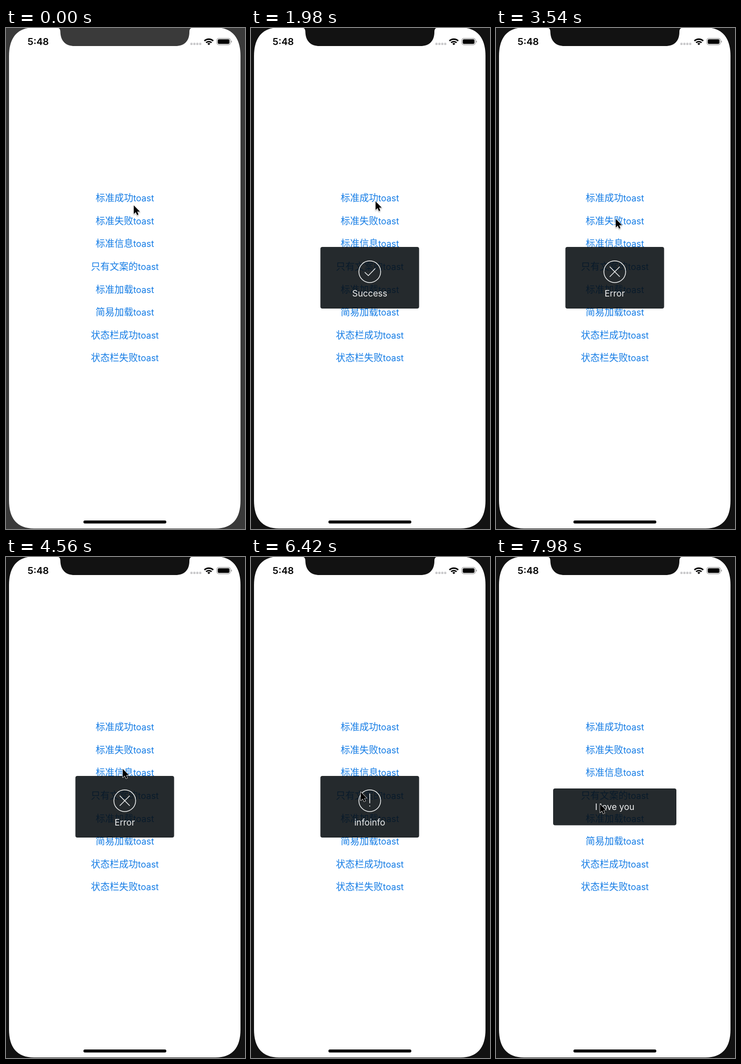
An HTML page for the animation above (8000 ms loop, 477x1000 px).

```html
<!DOCTYPE html>
<html lang="zh-CN">
<head>
<meta charset="utf-8">
<title>Toast demo</title>
<style>
  html, body { margin: 0; width: 100%; height: 100%; overflow: hidden; background: #121212; }
  svg { display: block; width: 100%; height: 100%; }
  text { font-family: Inter, "Noto Sans CJK SC", "Noto Sans CJK", sans-serif; }
  .label { font-size: 18.75px; fill: #147ce5; text-anchor: middle; }
  .label tspan { font-size: 17.7px; }
  .toast text { font-size: 17.4px; fill: #f0f1f1; text-anchor: middle; }
  .toast rect { fill: rgb(7, 13, 16); fill-opacity: .88; }
  .icon { fill: none; stroke: #eef0f0; stroke-width: 1.5; }
</style>
</head>
<body>
<svg viewBox="0 0 477 1000" preserveAspectRatio="none">
  <defs>
    <filter id="soft" x="-50%" y="-50%" width="200%" height="200%">
      <feDropShadow dx="0" dy="1.5" stdDeviation="1.3" flood-color="#000" flood-opacity=".35"/>
    </filter>
  </defs>

  <rect class="bezel" width="477" height="1000"/>
  <path fill="#fff" d="M6 56C6 20 22 -1 56 -1H418C452 -1 468 20 468 56V943C468 979 452 999 418 999H56C22 999 6 979 6 943Z"/>
  <path class="bezel" d="M102 -1C107 0 108.500 3 108.500 8C109 26 119 36 137 36H338C356 36 366 26 366 8C366 3 367.500 0 373 -1Z"/>

  <text x="43" y="34" font-size="19" font-weight="600">5:48</text>
  <g id="dots" fill="#c9c9cb"></g>
  <g fill="none" stroke="#000" stroke-width="2.900">
    <path d="M396 25.800a12.700 12.700 0 0 1 17.600 0"/>
    <path d="M399.300 29.300a8 8 0 0 1 11 0"/>
    <path d="M404.800 34.200l-2.900 -2.900a4.200 4.200 0 0 1 5.800 0Z" fill="#000" stroke="none"/>
  </g>
  <rect x="420.800" y="20.600" width="27" height="13" rx="4" fill="none" stroke="#9b9b9b" stroke-width="1.200"/>
  <rect x="422.600" y="22.400" width="23.400" height="9.400" rx="2.300"/>
  <path d="M449.200 24.800q1.800 .7 1.800 2.300t-1.800 2.300Z" fill="#9b9b9b"/>
  <rect x="154.500" y="983" width="165.500" height="6" rx="3"/>

  <g id="labels"></g>
  <g id="toasts"></g>
  <path id="cursor" d="M0 0V17.200L4 13.500L6.600 19.400L9.400 18.200L6.900 12.400H12.300Z"
        fill="#000" stroke="#fff" stroke-width="1.300" stroke-linejoin="round" paint-order="stroke" filter="url(#soft)"/>
</svg>

<script>
const NS = "http://www.w3.org/2000/svg";
const LOOP = 8000, STEP = 60;
const PRESS = 100, RESTORE = 470, HOLD = 2000, FADE_IN = 60, FADE_OUT = 180;
const WAKE = 320;

const names = ["标准成功", "标准失败", "标准信息", "只有文案的", "标准加载", "简易加载", "状态栏成功", "状态栏失败"];

// Each toast belongs to the button with the same index.
const toasts = [
  { at: 420, text: "Success", icon: "M227 487.500L234.200 494.300L248 480" },
  { at: 2690, text: "Error", icon: "M227 476.500L247 496.500M247 476.500L227 496.500" },
  { at: 5050, text: "infoinfo", icon: "M237 472V491.500M237 496V498" },
  { at: 7300, text: "I love you" }
];

// Cursor moves: start, end, x, y
const moves = [
  [0, 0, 255, 354],
  [60, 280, 250, 341],
  [1860, 2400, 239, 381],
  [3600, 4140, 233, 423],
  [6000, 6400, 219, 469],
  [7600, 7960, 207.5, 493]
];

const $ = id => document.getElementById(id);
const clamp = v => Math.min(1, Math.max(0, v));
const ease = v => v * v * (3 - 2 * v);

function add(parent, tag, attrs, text) {
  const el = document.createElementNS(NS, tag);
  for (const key in attrs) el.setAttribute(key, attrs[key]);
  if (text) el.textContent = text;
  parent.appendChild(el);
  return el;
}

for (let i = 0; i < 4; i++) {
  add($("dots"), "rect", { x: 368 + i * 5.8, y: 29.6, width: 4.4, height: 4.4, rx: 1.3 });
}

const labels = names.map((name, i) => {
  const el = add($("labels"), "text", { class: "label", x: 237.2, y: 346.2 + i * 45.6 }, name);
  add(el, "tspan", {}, "toast");
  return el;
});

for (const toast of toasts) {
  const g = toast.el = add($("toasts"), "g", { class: "toast" });
  const box = toast.icon
    ? { x: 138.5, y: 437, width: 197, height: 123, rx: 4 }
    : { x: 114, y: 462, width: 246, height: 73.5, rx: 4 };
  add(g, "rect", box);
  if (toast.icon) {
    add(g, "circle", { class: "icon", cx: 237, cy: 486.5, r: 21.7 });
    add(g, "path", { class: "icon", d: toast.icon });
  }
  add(g, "text", { x: 237, y: toast.icon ? 536 : 505.2 }, toast.text);
}

function labelAlpha(t, release) {
  if (t < release - PRESS) return 1;
  return 0.2 + 0.8 * ease(clamp((t - release) / RESTORE));
}

function toastAlpha(t, start) {
  return clamp((t - start) / FADE_IN) * (1 - clamp((t - start - HOLD) / FADE_OUT));
}

function cursorAt(t) {
  let [, , x, y] = moves[0];
  for (const [start, end, toX, toY] of moves.slice(1)) {
    const k = ease(clamp((t - start) / (end - start)));
    x += (toX - x) * k;
    y += (toY - y) * k;
  }
  return [x, y];
}

function draw(t) {
  const bezel = t < WAKE ? "#3a3a3a" : "#121212";
  document.querySelectorAll(".bezel").forEach(el => el.setAttribute("fill", bezel));
  toasts.forEach((toast, i) => {
    labels[i].setAttribute("opacity", labelAlpha(t, toast.at));
    toast.el.setAttribute("opacity", toastAlpha(t, toast.at));
  });
  $("cursor").setAttribute("transform", `translate(${cursorAt(t)})`);
}

const began = performance.now();
function tick() {
  const t = (performance.now() - began) % LOOP;
  draw(Math.floor(t / STEP) * STEP);
  requestAnimationFrame(tick);
}
tick();
</script>
</body>
</html>
```
